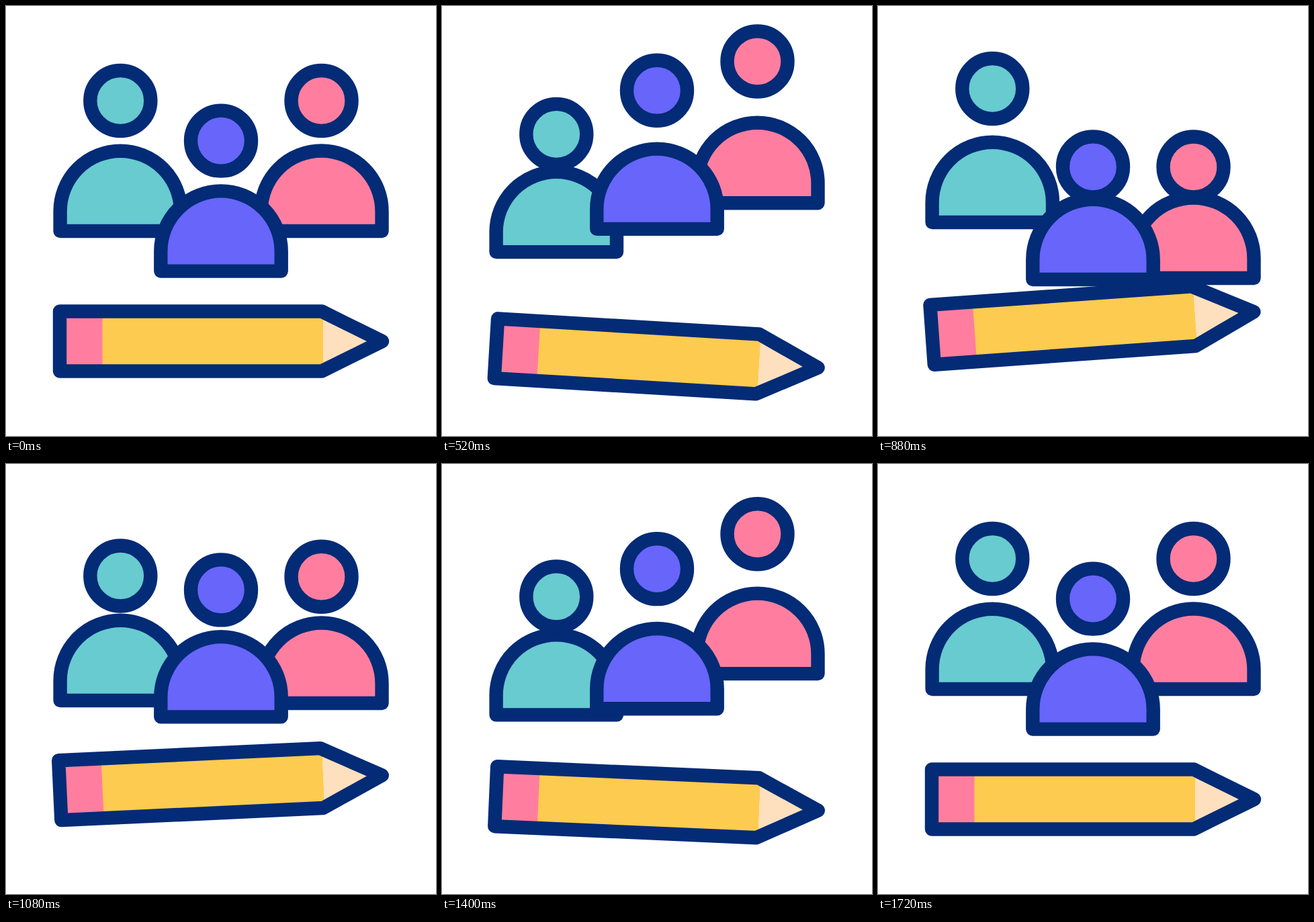
Recreate the animation shown at these times as an HTML page. Size 640x640 px, loop 2 s.

```html
<!DOCTYPE html>
<html lang="en">
<head>
<meta charset="utf-8">
<title>Team and pencil</title>
<style>
  html, body { margin: 0; width: 100%; height: 100%; overflow: hidden; background: #fff; }
  svg { display: block; width: 100vw; height: 100vh; }
  .line { stroke: #042b76; stroke-width: 20.4; stroke-linejoin: round; }
</style>
</head>
<body>
<svg viewBox="0 0 640 640">
  <g fill="#67cbd0" transform="translate(170.3 141)">
    <path id="tealBody" class="line" d="M-89.7 194V164.500a89.700 89.700 0 0 1 179.400 0V194Z"/>
    <circle id="tealHead" class="line" r="45"/>
  </g>
  <g fill="#ff7e9f" transform="translate(469.500 141)">
    <path id="pinkBody" class="line" d="M-90 194V164.500a90 90 0 0 1 180 0V194Z"/>
    <circle id="pinkHead" class="line" r="45"/>
  </g>
  <g fill="#6865fa" transform="translate(320 200.600)">
    <path id="blueBody" class="line" d="M-89.700 194V164.500a89.700 89.700 0 0 1 179.400 0V194Z"/>
    <circle id="blueHead" class="line" r="45"/>
  </g>
  <g id="pencil">
    <path fill="#fdcb50" d="M-240-44.500H152.500V44.500H-240Z"/>
    <path fill="#ff7e9f" d="M-240-44.500H-176.500V44.500H-240Z"/>
    <path fill="#fee0be" d="M152.500-44.500L240 0L152.500 44.500Z"/>
    <path class="line" fill="none" d="M-240-44.500H150L240 0L150 44.500H-240Z"/>
  </g>
</svg>
<script>
const LOOP = 2000, STEP = 40;
const el = id => document.getElementById(id);

// Each track is a list of [ms, value] keys, eased in and out between them.
const swing = (a, b, c, mid = 880, late = 1280) =>
  [[280, 0], [640, a], [mid, b], [late, c], [1720, 0]];

const parts = {
  tealHead: swing(67.3, -18, 69),
  tealBody: swing(42, -13, 47),
  pinkHead: swing(-79, 98.5, -45),
  pinkBody: swing(-56.4, 70, -28),
  blueHead: swing(-101, 41, -54.4, 840),
  blueBody: swing(-84.7, 13.7, -39, 840, 1260)
};
const lift = [[80, 0], [280, -55], [640, 53], [960, -41.5], [1280, 12.4], [1520, 0]];
const tilt = [[80, 0], [280, -8], [640, 7.4], [960, -6.2], [1280, 5], [1520, 0]];

function valueAt(keys, t) {
  const i = keys.findIndex(k => k[0] > t);
  if (i < 1) return 0;
  const [t0, v0] = keys[i - 1], [t1, v1] = keys[i];
  const p = (t - t0) / (t1 - t0);
  return v0 + (v1 - v0) * p * p * (3 - 2 * p);
}

function draw(t) {
  for (const id in parts)
    el(id).setAttribute('transform', `translate(0 ${valueAt(parts[id], t)})`);
  el('pencil').setAttribute('transform',
    `translate(320 ${499 + valueAt(lift, t)}) rotate(${valueAt(tilt, t)})`);
}

const start = performance.now();
function tick() {
  const t = (performance.now() - start) % LOOP;
  draw(Math.floor(t / STEP) * STEP);
  requestAnimationFrame(tick);
}
draw(0);
requestAnimationFrame(tick);
</script>
</body>
</html>
```
